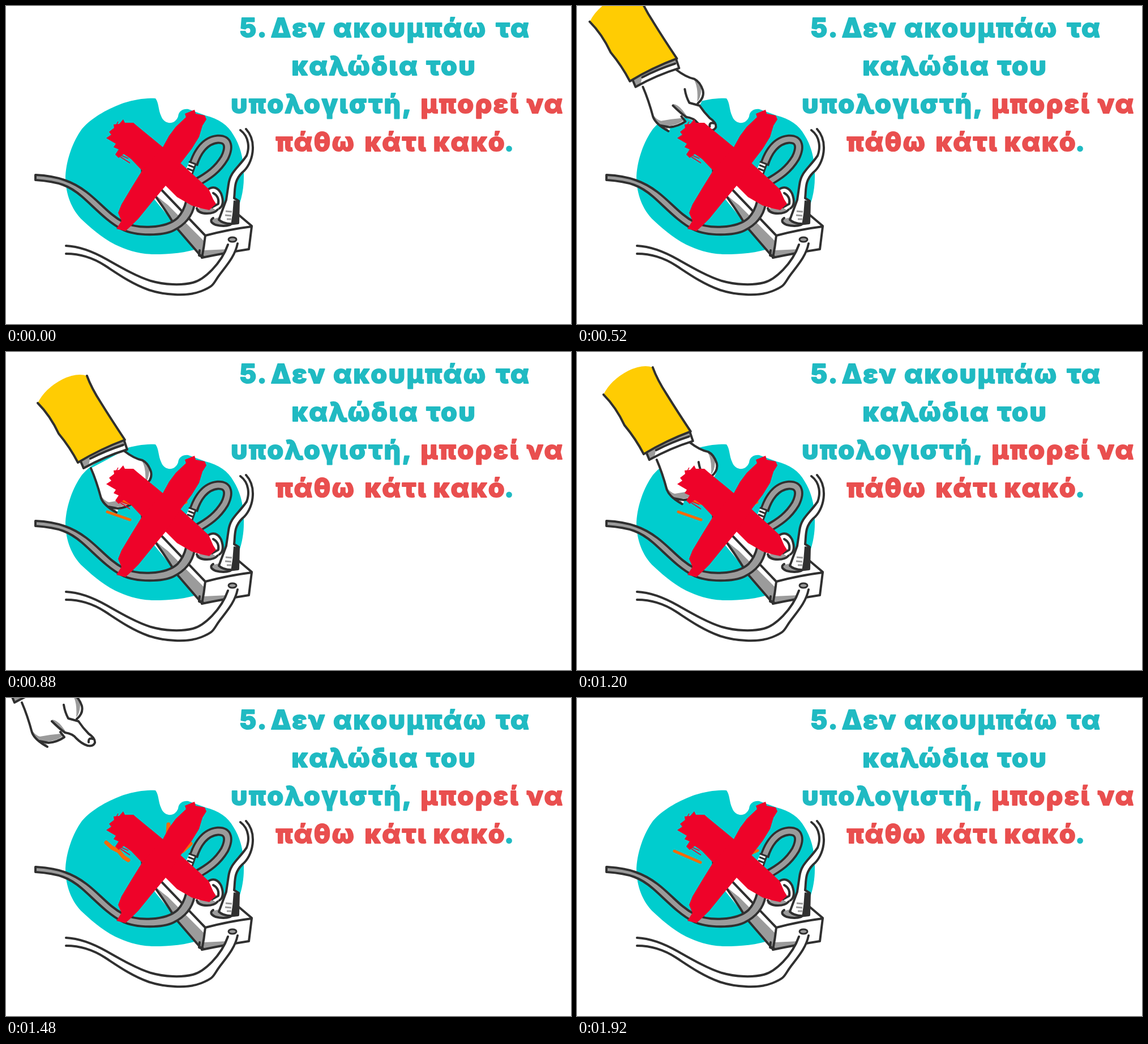
Recreate the animation shown at these times as an HTML page. Size 998 px wide and 561 px high, loop 2 s.

```html
<!DOCTYPE html>
<html lang="el">
<head>
<meta charset="utf-8">
<title>Καλώδια</title>
<style>
  html, body { margin: 0; width: 100%; height: 100%; overflow: hidden; background: #fff; }
  svg { display: block; width: 998px; height: 561px; }
  .ink { fill: none; stroke: #303030; stroke-width: 4; stroke-linecap: round; stroke-linejoin: round; }
  .paper { fill: #fff; }
  .shade { fill: #9b9b9b; }
  .dark { fill: #303030; }
  .cable { fill: none; stroke-linejoin: round; }
  .words { font: 800 46px Inter, "Noto Sans", sans-serif; letter-spacing: 2.8px; text-anchor: middle;
           stroke-width: 2.2; stroke-linejoin: round; }
  .spark { fill: none; stroke: #f76a08; stroke-linecap: round; stroke-linejoin: round; }
</style>
</head>
<body>
<svg viewBox="0 0 998 561">
  <path fill="#00cdce" d="M264 163C270 170 269 184 274 194C279 209 298 211 304 195C305 185 313 181 322 182L352 193C376 199 392 210 402 228C414 246 421 274 420 303C420 350 396 405 345 426C318 436 289 438 262 438C235 438 212 430 193 421C168 408 148 390 132 375C112 353 105 326 105 300C107 268 119 238 134 217C153 195 183 180 208 171C228 165 248 162 264 163Z"/>

  <!-- power strip -->
  <path class="paper" d="M240 284L270 272L434 388L429 429L346 444L241 315Z"/>
  <path class="shade" d="M255 321L262 319Q282 337 302 360L352 408L346 443L300 390Z"/>
  <path class="paper" d="M240 287L352 405L349 414L286 351Q258 330 243 310Z"/>
  <path class="paper" d="M352 405L434 389L429 428L347 443Z"/>
  <path class="shade" d="M349 431L392 429L390 437L347 444Z"/>
  <path class="ink" d="M240 284L242 312M252 320Q276 350 300 390L345 442M262 311L352 405Q394 394 434 389L429 429Q390 435 346 444Q350 424 352 405M408 366L434 388"/>
  <path class="ink" d="M342 431L341 440L350 443"/>

  <!-- sockets and ring -->
  <ellipse class="shade" cx="353" cy="361" rx="17" ry="6"/>
  <path class="ink" d="M337 357Q340 366 355 366Q368 366 374 359"/>
  <ellipse class="shade" cx="381" cy="380" rx="18" ry="7"/>
  <path class="ink" d="M366 374Q357 380 370 386Q385 390 396 386"/>
  <path class="paper" d="M352 323Q368 314 379 331Q387 347 377 356L365 353Z"/>
  <path class="ink" d="M356 324Q371 314 380 331Q387 350 377 357M366 330Q377 336 375 349L364 355"/>

  <!-- grey cables -->
  <path class="shade" d="M52 298C92 300 118 310 142 328S182 368 207 381S282 393 303 374Q314 362 318 345L333 350C329 372 314 387 296 396S232 407 205 394S158 357 134 336S94 310 52 307Z"/>
  <path class="ink" d="M53 298C92 300 118 310 142 328S182 368 207 381S282 393 303 374Q314 362 318 345M53 307C94 310 112 317 134 336S179 381 205 394S278 405 296 396S329 372 333 350M52 298L52 307"/>
  <g class="cable">
    <path stroke="#303030" stroke-width="16.5" d="M331 280C338 257 352 237 374 235C394 234 395 250 386 268C374 288 358 300 335 312"/>
    <path stroke="#9b9b9b" stroke-width="9" d="M330 282C338 257 352 237 374 235C394 234 395 250 386 268C374 288 358 300 334 313"/>
  </g>
  <path class="paper" d="M324 275L335 279L328 299L316 292Z"/>
  <path class="ink" style="stroke-width:3" d="M324 275L335 279L328 299M323 281L333 285M321 287L331 291"/>

  <!-- white cable with plug -->
  <path class="paper" d="M414 218C430 231 430 251 425 264C410 286 396 292 393 315L389 342L376 377Q386 387 410 381L411 344L403 339C405 323 402 309 417 294C437 278 444 239 424 217Z"/>
  <path class="dark" d="M402 343L411 344L412 383L397 387Q401 365 402 343Z"/>
  <path class="ink" d="M414 219C430 231 430 251 425 264C410 286 396 292 393 315L389 342L376 377Q386 387 410 383L411 344L403 339C405 323 402 309 417 294C437 278 444 239 424 217"/>
  <path fill="none" stroke="#9b9b9b" stroke-width="3" d="M388 362L399 363M387 369L398 370M390 376L398 376"/>

  <!-- lower white cable -->
  <path class="paper" d="M106 423C130 424 155 434 178 447S232 478 256 485S310 493 330 488S382 455 392 419L410 419C405 440 391 458 378 473S365 490 345 503S280 510 250 500S198 474 175 458S130 437 106 437Z"/>
  <path class="ink" d="M106 423C130 424 155 434 178 447S232 478 256 485S310 493 330 488S380 455 392 421M106 437C130 437 152 443 175 458S222 490 250 500S320 513 345 503S365 490 378 473S405 440 409 419"/>
  <ellipse class="ink" cx="400" cy="412" rx="7" ry="4" style="fill:#9b9b9b;stroke-width:3"/>

  <g id="hand" visibility="hidden">
    <path class="paper" d="M150 205Q160 228 168 258Q173 271 195 283Q200 280 197 274Q212 275 225 266L222 258Q235 263 246 268Q256 278 266 281Q276 283 279 276Q280 268 268 260Q258 250 250 238Q259 224 256 211Q251 196 241 191Q226 188 208 174Z"/>
    <path class="shade" d="M168 254Q174 263 182 265L200 262L219 260L221 265Q210 273 193 274L194 281Q174 271 169 263ZM203 235Q212 236 220 246L229 258L216 253ZM240 192Q253 198 253 211Q252 225 246 231Q248 205 240 192Z"/>
    <path class="ink" d="M150 205Q160 228 168 258Q173 271 195 283M181 273L197 276Q212 275 225 266L218 257M203 238Q215 250 226 258Q240 260 246 268Q256 278 266 281Q276 283 279 276Q280 268 268 260Q258 250 250 238L232 233Q226 222 224 209M247 234Q259 224 256 211Q251 196 241 191Q226 188 208 174M268 275Q267 267 275 269"/>
    <path class="paper" d="M131 191L137 206Q175 184 214 172L208 154Z"/>
    <path class="shade" d="M132 194Q170 172 208 156L211 162Q171 174 149 186L146 200L138 204Z"/>
    <path class="ink" d="M132 193L137 205Q175 184 214 172L209 157M149 188Q176 174 207 164"/>
    <path fill="#ffcc03" d="M56 90Q69 64 100 48Q125 36 143 42Q151 64 168 90Q186 119 210 155Q167 171 127 195Q113 168 93 144Q78 112 56 90Z"/>
    <path class="ink" d="M56 90Q78 112 93 144Q113 168 127 195Q167 171 210 155Q186 119 168 90Q151 64 143 42"/>
  </g>

  <path id="spark" class="spark"/>

  <!-- brush cross -->
  <g fill="#ee0329">
    <path d="M177 233L186 227L182 222L191 215L190 209L200 208L207 200L210 206L225 206L232 212L277 249L308 277L340 306L358 323L366 341L371 349L359 360L345 357L328 352L302 337L282 317L240 290L221 270L208 261L199 268L193 262L199 253L190 249L194 243Z"/>
    <path d="M277 249L288 229L300 213L318 196L316 190L333 183L335 190L351 193L354 200L347 211L341 231L328 252L308 278L282 317L256 348L234 375L222 387L211 397L195 393L204 379L198 365L204 350L222 320L240 291Z"/>
  </g>
  <path fill="none" stroke="#ee0329" stroke-width="1.5" d="M200 262L216 269M202 266L219 277M188 223L198 204"/>

  <g id="words" class="words"></g>
</svg>
<script>
const TEAL = '#20bac2', RED = '#e94f4f', LOOP = 2000, STEP = 40;
const $ = id => document.getElementById(id);

// baseline, then word / centre / colour
const lines = [
  [55, ['5.', 438, TEAL], ['Δεν', 517, TEAL], ['ακουμπάω', 714, TEAL], ['τα', 896, TEAL]],
  [122, ['καλώδια', 617, TEAL], ['του', 787, TEAL]],
  [189, ['υπολογιστή,', 558, TEAL], ['μπορεί', 820, RED], ['να', 953, RED]],
  [256, ['πάθω', 547, RED], ['κάτι', 689, RED], ['κακό', 819, RED], ['.', 890, TEAL]]
];
for (const [y, ...words] of lines) {
  for (const [word, x, color] of words) {
    const text = document.createElementNS('http://www.w3.org/2000/svg', 'text');
    text.setAttribute('x', x);
    text.setAttribute('y', y);
    text.setAttribute('fill', color);
    text.setAttribute('stroke', color);
    text.textContent = word;
    $('words').append(text);
  }
}

const sparks = [
  { width: 5, d: 'M179 282L219 296M205 263L219 267M310 268L318 265' },
  { width: 5, d: 'M172 270L218 290M304 276L319 269' },
  { width: 5, d: 'M174 262L218 288M287 228L290 242M310 272L334 258' },
  { width: 7, d: 'M177 255L187 264L199 270L208 281L216 286M287 223L286 240M326 257L312 270' }
];
const SPARK_START = 880, SPARK_STEP = 80;

// 0 at rest on the strip, 1 at the edge of the stage
function away(t) {
  if (t < 862) return ((862 - t) / 502) ** 3;
  if (t < 995) return 0;
  return ((t - 995) / 485) ** 3;
}

function draw(time) {
  const t = Math.floor(time % LOOP / STEP) * STEP;
  const y = away(t);
  const x = t < 920 ? y ** 1.12 : y; // the way in bows slightly
  $('hand').setAttribute('visibility', t >= 360 && t < 1520 ? 'visible' : 'hidden');
  $('hand').setAttribute('transform', `translate(${-122 * x} ${-197 * y})`);

  const lit = t >= SPARK_START;
  const spark = lit ? sparks[Math.floor((t - SPARK_START) / SPARK_STEP) % sparks.length] : null;
  $('spark').setAttribute('d', lit ? spark.d : '');
  $('spark').setAttribute('stroke-width', lit ? spark.width : 0);
}

const start = performance.now();
function tick() {
  draw(performance.now() - start);
  requestAnimationFrame(tick);
}
tick();
</script>
</body>
</html>
```
